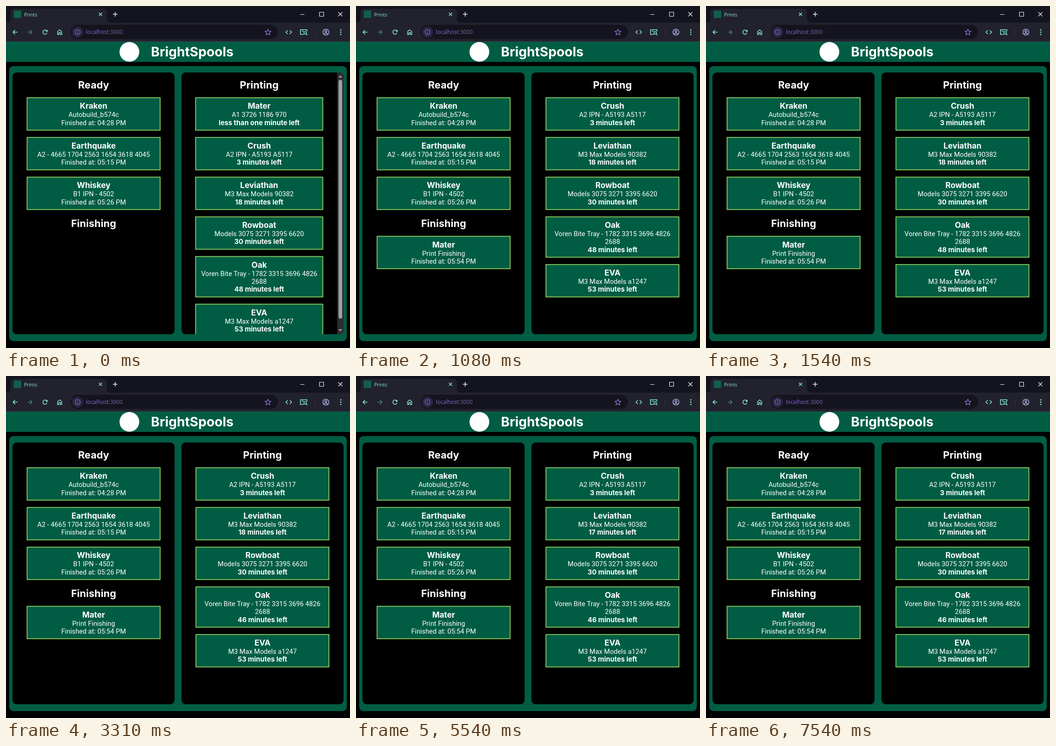
These frames come from a looping animation (750 by 746 pixels, 8000 ms). An HTML page with a canvas:

```html
<!DOCTYPE html>
<html lang="en">
<head>
<meta charset="utf-8">
<title>Prints</title>
<style>
  html, body { margin: 0; width: 100%; height: 100%; overflow: hidden; background: #000; }
  canvas { display: block; width: 750px; height: 746px; }
</style>
</head>
<body>
<canvas id="stage"></canvas>
<script>
const W = 750, H = 746, LOOP = 8000;
const canvas = document.getElementById('stage');
const ctx = canvas.getContext('2d');
const ratio = window.devicePixelRatio || 1;
canvas.width = W * ratio;
canvas.height = H * ratio;

const GREEN = '#005d43', LIME = '#8fcb5c', MINT = '#86efcb', PURPLE = '#8a68d6';
const STRIP = '#13141d', BAR = '#22212e';
const PLAIN = '400 14.7px Roboto, sans-serif';
const STRONG = '700 14.8px Inter, sans-serif';
const NAME = '700 17.3px Inter, sans-serif';
const HEADING = '700 22px Inter, sans-serif';
const TITLE = '700 28.5px Inter, sans-serif';
const LINE = 17.35, GAP = 14.1, CARD = 72.5;

function box(x, y, w, h, fill, radius = 0) {
  ctx.fillStyle = fill;
  ctx.beginPath();
  ctx.roundRect(x, y, w, h, radius);
  ctx.fill();
}

function disc(x, y, r, fill) {
  ctx.fillStyle = fill;
  ctx.beginPath();
  ctx.arc(x, y, r, 0, Math.PI * 2);
  ctx.fill();
}

function ring(x, y, r, color, width = 1.4, from = 0, to = Math.PI * 2) {
  ctx.strokeStyle = color;
  ctx.lineWidth = width;
  ctx.beginPath();
  ctx.arc(x, y, r, from, to);
  ctx.stroke();
}

function path(d, color, width = 1.6, x = 0, y = 0) {
  ctx.save();
  ctx.translate(x, y);
  ctx.strokeStyle = color;
  ctx.lineWidth = width;
  ctx.stroke(new Path2D(d));
  ctx.restore();
}

function shape(d, fill, x = 0, y = 0) {
  ctx.save();
  ctx.translate(x, y);
  ctx.fillStyle = fill;
  ctx.fill(new Path2D(d));
  ctx.restore();
}

function text(str, x, y, font, fill = '#fff', align = 'center') {
  ctx.font = font;
  ctx.fillStyle = fill;
  ctx.textAlign = align;
  ctx.fillText(str, x, y);
}

function drawTabs() {
  box(0, 0, W, 37, STRIP);
  shape('M2 36Q10 36 10 28V14Q10 6 18 6H212Q220 6 220 14V28Q220 36 228 36Z', BAR);
  box(17, 10, 16, 16, '#12604a');
  text('Prints', 39.5, 22.5, '400 10.5px "Open Sans", sans-serif', MINT, 'left');
  path('M-3.3 -3.3L3.3 3.3M3.3 -3.3L-3.3 3.3', MINT, 1.5, 206, 18);
  path('M-5 0H5M0 -5V5', '#f2f2f5', 1.5, 238, 18);
  path('M-4.5 0H4.5', '#fff', 1, 646, 18.5);
  path('M-4.5 -4.5H4.5V4.5H-4.5Z', '#fff', 1.1, 688, 18);
  path('M-4.5 -4.5L4.5 4.5M4.5 -4.5L-4.5 4.5', '#fff', 1.1, 729, 18);
}

function starPath(outer, inner) {
  let d = '';
  for (let i = 0; i < 10; i++) {
    const a = i * Math.PI / 5 - Math.PI / 2, r = i % 2 ? inner : outer;
    d += (i ? 'L' : 'M') + r * Math.cos(a) + ' ' + r * Math.sin(a);
  }
  return d + 'Z';
}
const STAR = starPath(6.8, 3.1);

function drawToolbar() {
  box(0, 36, W, 41, BAR);
  box(0, 77, W, 1, '#3b3a48');
  box(141, 41, 452, 31, STRIP, 15.5);

  const arrow = 'M5 0H-4.5M0 -4.8L-4.8 0L0 4.8';
  path(arrow, MINT, 1.6, 20, 57);
  ctx.save();
  ctx.scale(-1, 1);
  path(arrow, '#468471', 1.6, -52, 57);
  ctx.restore();

  ring(85, 57, 4.6, MINT, 1.6, 0.35, Math.PI * 1.78);
  shape('M5.6 -5.6V-0.8H0.8Z', MINT, 85, 57);
  path('M-4.5 5.2V-1.2L0 -5L4.5 -1.2V5.2H1.6V1H-1.6V5.2Z', MINT, 1.5, 117, 57);

  disc(156, 57, 12, '#2a2540');
  ring(156, 57, 5.6, PURPLE, 1.3);
  box(155.3, 56, 1.4, 4, PURPLE);
  box(155.3, 53.5, 1.4, 1.5, PURPLE);

  const font = '400 11.9px "Open Sans", sans-serif';
  text('localhost', 174, 61, font, PURPLE, 'left');
  const hostWidth = ctx.measureText('localhost').width;
  text(':3000', 174 + hostWidth, 61, font, '#7566a3', 'left');

  path(STAR, '#9579dc', 1.3, 571, 57.4);
  path('M-2.2 -4L-6.2 0L-2.2 4M2.2 -4L6.2 0L2.2 4', MINT, 1.6, 616.5, 57);
  path('M0 5H-7V-5.2H7V-1.5M-4 -2H0', MINT, 1.6, 649, 57);
  ring(652.2, 58.8, 2.8, MINT, 1.5);
  path('M654.2 60.8L657.2 63.8', MINT, 1.6);
  box(673, 49, 1, 16, '#393746');

  const pale = '#b5bff0';
  ring(697.5, 57, 6.6, pale, 1.4);
  ring(697.5, 55.2, 2.1, pale, 1.4);
  path('M-4.6 4.5Q0 0.4 4.6 4.5', pale, 1.4, 697.5, 57);
  for (const y of [52, 57, 62]) disc(730, y, 1.5, MINT);
}

function drawCard(left, right, top, [name, ...lines]) {
  const height = CARD + (lines.length - 2) * LINE;
  const mid = (left + right) / 2;
  box(left, top, right - left, height, GREEN);
  ctx.strokeStyle = LIME;
  ctx.lineWidth = 1.8;
  ctx.strokeRect(left + 0.9, top + 0.9, right - left - 1.8, height - 1.8);
  text(name, mid, top + 25, NAME);
  lines.forEach((line, i) => {
    const bold = line.endsWith('left');
    text(line, mid, top + 43 + i * LINE, bold ? STRONG : PLAIN);
  });
  return top + height + GAP;
}

function drawCards(left, right, top, cards) {
  for (const card of cards) top = drawCard(left, right, top, card);
}

const ready = [
  ['Kraken', 'Autobuild_b574c', 'Finished at: 04:28 PM'],
  ['Earthquake', 'A2 - 4665 1704 2563 1654 3618 4045', 'Finished at: 05:15 PM'],
  ['Whiskey', 'B1 IPN - 4502', 'Finished at: 05:26 PM']
];
const finishing = [['Mater', 'Print Finishing', 'Finished at: 05:54 PM']];

function printing(t) {
  const jobs = [
    ['Crush', 'A2 IPN - A5193 A5117', '3 minutes left'],
    ['Leviathan', 'M3 Max Models 90382', (t < 5540 ? 18 : 17) + ' minutes left'],
    ['Rowboat', 'Models 3075 3271 3395 6620', '30 minutes left'],
    ['Oak', 'Voren Bite Tray - 1782 3315 3696 4826', '2688',
      (t < 3310 ? 48 : 46) + ' minutes left'],
    ['EVA', 'M3 Max Models a1247', '53 minutes left']
  ];
  if (t < 1080) jobs.unshift(['Mater', 'A1 3726 1186 970', 'less than one minute left']);
  return jobs;
}

function drawScrollbar() {
  box(722, 145, 14, 571, '#2c2c2c');
  box(725, 161, 8, 521, '#9f9f9f', 4);
  shape('M-4 2.5L0 -2.5L4 2.5Z', '#9f9f9f', 729, 153.5);
  shape('M-4 -2.5L0 2.5L4 -2.5Z', '#9f9f9f', 729, 707.5);
}

function drawPage(t) {
  box(0, 78, W, 44, GREEN);
  disc(269, 100, 21.5, '#fff');
  text('BrightSpools', 406, 110, TITLE);
  box(7, 131, 736, 600, GREEN, 9);

  box(14, 145, 353.5, 571, '#000', 9);
  text('Ready', 191, 179.5, HEADING);
  drawCards(45, 337, 199.2, ready);
  text('Finishing', 191, 482, HEADING);
  if (t >= 1000) drawCards(45, 337, 501.5, finishing);

  const scrolls = t < 1080;
  box(382.5, 145, 353.5, 571, '#000', 9);
  ctx.save();
  ctx.beginPath();
  ctx.roundRect(382.5, 145, 353.5, 571, 9);
  ctx.clip();
  text('Printing', scrolls ? 552 : 559, 179.5, HEADING);
  drawCards(scrolls ? 412.5 : 413.3, scrolls ? 691.5 : 705, 199.2, printing(t));
  if (scrolls) drawScrollbar();
  ctx.restore();
}

function frame() {
  const t = performance.now() % LOOP;
  ctx.setTransform(ratio, 0, 0, ratio, 0, 0);
  box(0, 0, W, H, '#000');
  drawTabs();
  drawToolbar();
  drawPage(t);
  requestAnimationFrame(frame);
}
frame();
</script>
</body>
</html>
```
